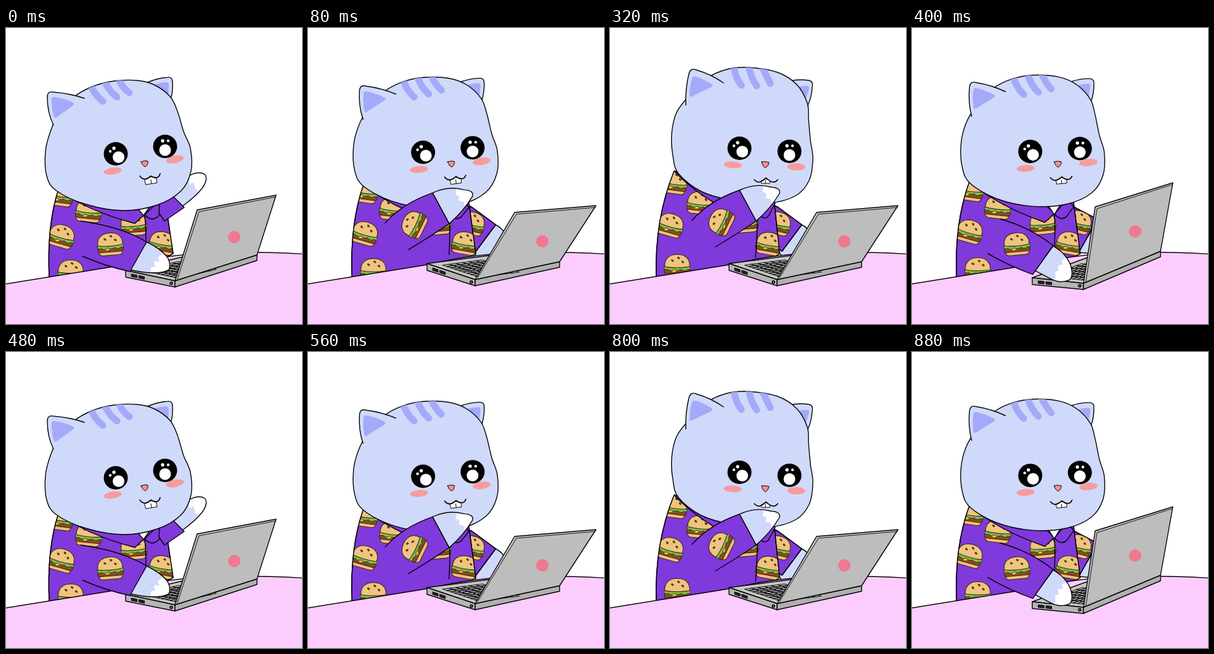
Animation, 480 px wide and 480 px high, one loop 960 ms. Source, as an HTML page with a canvas:

```html
<!DOCTYPE html>
<html lang="en">
<head>
<meta charset="utf-8">
<title>Cat at a laptop</title>
<style>
html, body { margin: 0; height: 100%; overflow: hidden; background: #fff; }
canvas { display: block; }
</style>
</head>
<body>
<canvas id="stage" width="480" height="480"></canvas>
<script>
const g = document.getElementById('stage').getContext('2d');
const STEP = 80;
const FUR = '#cfd9fa', MARK = '#a5a9fa', BLUSH = '#f79c9c', SHIRT = '#8039da', INK = '#000';

// How far the cat leans to the right in each step; arms cycle every three steps.
const LEAN = [0, .27, .78, 1.12, 1, .43];
const ARMS = ['raised', 'chin', 'typing'];

const LAPTOP = {
  raised: { tl: [310, 295], tr: [438, 271], br: [407, 368], front: [274, 410], left: [194, 393], back: [296, 369], logo: [370, 339] },
  chin: { tl: [335, 299], tr: [467, 288], br: [408, 379], front: [271, 408], left: [193, 382], back: [301, 368], logo: [380, 346] },
  typing: { tl: [297, 290], tr: [423, 251], br: [403, 362], front: [278, 414], left: [195, 405], back: [288, 371], logo: [362, 330] }
};

let k = 0; // current lean

const mix = (a, b) => a + (b - a) * k;
const at = (a, b) => [mix(a[0], b[0]), mix(a[1], b[1])];

// Blends two path strings of the same structure by the lean.
function morph(a, b) {
  const ends = b.match(/-?[\d.]+/g);
  let i = 0;
  return a.replace(/-?[\d.]+/g, n => mix(+n, +ends[i++]));
}

function draw(path, fill, stroke = INK, width = 1.4) {
  const p = path instanceof Path2D ? path : new Path2D(path);
  if (fill) { g.fillStyle = fill; g.fill(p); }
  if (stroke) { g.strokeStyle = stroke; g.lineWidth = width; g.stroke(p); }
  return p;
}

function oval([x, y], rx, ry, fill, turn = 0) {
  g.beginPath();
  g.ellipse(x, y, rx, ry, turn, 0, 7);
  g.fillStyle = fill;
  g.fill();
}

function clipped(path, paint) {
  g.save();
  g.clip(path);
  paint();
  g.restore();
}

function shifted(dx, dy, paint) {
  g.save();
  g.translate(dx * k, dy * k);
  paint();
  g.restore();
}

const poly = points => new Path2D('M' + points.map(p => p.join(' ')).join('L') + 'Z');

// Closed smooth curve through all points.
function smooth(pts) {
  const path = new Path2D(), n = pts.length;
  path.moveTo(...pts[0]);
  pts.forEach((p, i) => {
    const before = pts[(i + n - 1) % n], q = pts[(i + 1) % n], after = pts[(i + 2) % n];
    path.bezierCurveTo(p[0] + (q[0] - before[0]) / 6, p[1] + (q[1] - before[1]) / 6,
      q[0] - (after[0] - p[0]) / 6, q[1] - (after[1] - p[1]) / 6, ...q);
  });
  path.closePath();
  return path;
}

function burger(x, y, degrees) {
  const line = '#3a2412';
  g.save();
  g.translate(x, y);
  g.rotate(degrees * Math.PI / 180);
  g.scale(1.12, 1.1);
  draw('M-17 8H17Q18 16 11 16H-11Q-18 16 -17 8Z', '#eebf78', line, 1);
  draw('M-18 4H18Q20 11 15 11H-15Q-20 11 -18 4Z', '#8d4a20', line, 1);
  draw('M-14 4L-5 9L5 4Z', '#f6cf45', null);
  draw('M-19 1Q0 -3 19 1Q21 6 15 5Q11 9 6 5Q1 8 -4 5Q-9 9 -13 5Q-20 7 -19 1Z', '#77c34d', line, .8);
  draw('M-18 1C-19 -12 -10 -17 0 -17S19 -12 18 1Q0 4 -18 1Z', '#efc47e', line, 1);
  for (const [sx, sy] of [[-7, -8], [2, -12], [8, -6]]) oval([sx, sy], 2.2, 1.5, '#5b3515', .6);
  g.restore();
}

function paw(shape, tip) {
  const p = draw(shape, FUR, null);
  clipped(p, () => draw(tip, '#fff', null));
  draw(p, null);
}

function printedSleeve(shape, x, y, turn) {
  const sleeve = draw(shape, SHIRT);
  clipped(sleeve, () => burger(x, y, turn));
  draw(sleeve, null);
}

function rightArm(pose) {
  if (pose === 'raised') shifted(14, 1, () => {
    paw('M268 276L286 289Q308 273 318 260Q328 246 323 238Q314 231 298 239L270 262Z',
      'M294 236L298 254L304 250L307 261L318 270L336 230Z');
    draw('M250 270L270 272L289 291L257 313L248 300Z', SHIRT);
  });
  if (pose === 'chin') shifted(9, 0, () => {
    draw('M300 318Q312 324 318 334L284 382L262 362Z', FUR);
    printedSleeve('M250 284L264 291L302 319L270 362L250 350Z', 263, 317, 14);
  });
  if (pose === 'typing') {
    draw('M292 328L275 344L271 364L292 366Z', FUR);
    printedSleeve('M250 284L264 291L297 308Q293 327 284 340L270 365Z', 270, 315, 14);
  }
}

function leftArm(pose) {
  if (pose === 'chin') shifted(11, -6, () => {
    paw('M199 269Q225 257 250 264Q266 265 264 274Q250 298 226 319Z',
      'M232 258L238 266L236 271L243 275L241 281L250 284L252 300L275 280L266 255Z');
    draw('M122 318Q150 286 199 269L226 319Q195 340 160 361', SHIRT);
    burger(169, 320, -64);
  });
  if (pose === 'typing') shifted(9, -3, () => {
    g.translate(-5, 2);
    paw('M230 353Q250 364 258 383Q264 402 256 408Q240 415 222 404L201 393Z',
      'M254 372L244 376L246 383L238 384L239 393L233 394L234 404L228 412H270V372Z');
    draw('M144 309Q192 322 230 352L197 399Q160 386 124 365', SHIRT);
    burger(171, 350, -5);
  });
  if (pose === 'raised') shifted(8, -2, () => {
    paw('M228 347Q250 357 262 372Q268 384 264 392Q245 402 201 392Z',
      'M256 365L246 372L249 379L240 378L242 387L235 388V402H270V375Z');
    draw('M121 313Q190 323 228 347L201 395Q160 386 124 370', SHIRT);
    burger(169, 351, -5);
  });
}

function body() {
  const torso = new Path2D(morph('M85 262Q66 320 70 405L200 405L271 366L258 278L200 270Z',
    'M104 232Q72 310 75 405L210 405L275 366L266 278L200 260Z'));
  draw(torso, SHIRT);
  clipped(torso, () => {
    const spots = [
      [[88, 271], [104, 251], 8], [[134, 297], [146, 284], 6], [[90, 338], [98, 320], 16],
      [[105, 395], [109, 386], 0], [[207, 319], [219, 314], -5], [[253, 349], [258, 350], 10]
    ];
    for (const [a, b, turn] of spots) burger(...at(a, b), turn);
  });
  draw(torso, null);
  draw(morph('M225 304Q228 330 226 366', 'M239 300Q239 335 236 372'), null);
  draw(morph('M85 262Q130 296 209 317L225 302L200 280Z', 'M104 232Q145 276 224 313L239 299L200 260Z'), SHIRT);
  draw(morph('M225 303Q236 315 246 306L258 294L250 278Z', 'M239 299Q250 313 257 305L268 284L255 276Z'), SHIRT);
  draw(morph('M213 292L223 304L233 290Z', 'M232 283L241 301L250 283Z'), '#fff');
}

function head() {
  const left = [72, 168, 64, 200, 66, 240, 82, 264, 130, 286, 190, 296, 245, 287, 284, 264, 300, 232, 299, 195,
    288, 168, 278, 135, 266, 111, 240, 92, 212, 85, 175, 86, 140, 95, 110, 112, 85, 140];
  const right = [108, 137, 100, 172, 102, 207, 111, 236, 148, 265, 201, 280, 257, 284, 301, 272, 323, 247, 329, 212,
    325, 182, 322, 148, 320, 122, 303, 92, 272, 72, 225, 64, 190, 67, 158, 81, 130, 108];
  const points = [];
  for (let i = 0; i < left.length; i += 2) points.push([mix(left[i], right[i]), mix(left[i + 1], right[i + 1])]);

  draw(morph('M228 89Q245 81 262 80Q270 79 270 88Q271 102 267 116L250 117Z',
    'M296 85Q310 83 323 85Q330 87 328 95Q327 112 321 125L305 117Z'), FUR);
  draw(morph('M240 92Q252 88 260 88Q264 88 264 94L263 112Z', 'M304 96Q314 93 321 94Q324 95 322 101L317 117Z'), MARK, null);

  const skull = draw(smooth(points), FUR);
  clipped(skull, () => {
    draw(morph('M136 90Q143 108 157 119M158 82Q166 102 180 112M181 78Q187 96 200 105',
      'M200 59Q203 81 213 93M224 57Q228 81 238 94M245 59Q253 77 260 90'), null, MARK, 11);
  });

  const ear = new Path2D(morph('M77 157Q67 138 67 112Q67 102 77 104Q103 106 127 114',
    'M123 125Q122 98 128 74Q131 64 140 68Q164 75 184 89'));
  draw(ear, FUR);
  draw(morph('M74 116Q74 111 80 112Q97 115 109 121Q112 123 108 126L82 145Q78 147 77 142Q74 130 74 116Z',
    'M133 82Q134 77 140 79Q156 85 165 91Q168 93 164 96L133 111Q129 113 129 108Q129 96 133 82Z'), MARK, null);

  const tilt = mix(-.15, .07);
  oval(at([173, 232], [199, 222]), 14.5, 5.5, BLUSH, tilt);
  oval(at([274, 213], [302, 225]), 14.5, 6, BLUSH, tilt - .05);
  const leftEye = at([178, 204], [210, 195]), rightEye = at([258, 192], [291, 200]);
  const dot = ([x, y], dx, dy, r) => oval([x + dx, y + dy], r, r, '#fff');
  for (const eye of [leftEye, rightEye]) oval(eye, 19.5, 19, INK);
  dot(leftEye, 4.5, 5.5, 9.5);
  dot(leftEye, -3, -9, 2.7);
  dot(leftEye, -9, -4, 2.2);
  dot(rightEye, 0, 6, 9.5);
  dot(rightEye, -4, -9, 2.7);
  dot(rightEye, 5, -9, 2.2);
  draw(morph('M219 217Q225 214 230 216Q231 222 226 225Q222 224 219 217Z',
    'M246 217Q252 216 258 218Q257 224 252 227Q247 224 246 217Z'), '#f78f8c', INK, 1);
  draw(morph('M225 246L235 241L244 244L245 251L227 254Z', 'M245 248L252 244L260 248L259 252L246 252Z'), '#fff', INK, 1);
  draw(morph('M235 246L236 252', 'M252 247L252 252'), null, INK, 1);
  draw(morph('M217 240Q224 250 235 240Q247 247 250 236', 'M234 246Q242 255 253 243Q265 255 272 246'), null, INK, 1.7);
}

function base({ left, back, front, br }) {
  const far = [front[0] + back[0] - left[0], front[1] + back[1] - left[1]];
  const spot = (u, v) => [0, 1].map(i => left[i] + (front[i] - left[i]) * u + (back[i] - left[i]) * v);
  const down = ([x, y], d) => [x, y + d];
  draw(poly([left, back, far, front]), '#c6c6c6');
  draw(poly([left, front, down(front, 10), down(left, 11)]), '#b5b5b5');
  draw(poly([front, br, down(br, 9), down(front, 10)]), '#b0b0b0');
  draw(poly([spot(.16, .12), spot(.16, .72), spot(.92, .72), spot(.92, .12)]), '#b4b4b4', INK, .9);
  for (let i = 1; i < 6; i++) draw(poly([spot(.16, .12 + i * .1), spot(.92, .12 + i * .1)]), null, INK, .9);
  for (let i = 1; i < 9; i++) draw(poly([spot(.16 + i * .084, .12), spot(.16 + i * .084, .72)]), null, INK, .9);
  for (const u of [.12, .27]) {
    const a = spot(u, 0), b = spot(u + .11, 0);
    draw(poly([down(a, 4), down(b, 4), down(b, 8), down(a, 8)]), '#222', INK, 1);
  }
  oval([front[0] - 6, front[1] + 4], 2.7, 2.7, INK);
  oval([front[0] - 6, front[1] + 4], 1, 1, '#aaa');
}

function lid({ tl, tr, br, front, logo }) {
  draw(poly([tl, tr, br, front]), '#bdbdbd');
  draw(`M${front[0] + 4} ${front[1] - 3}L${tl[0] + 3} ${tl[1] + 3}L${tr[0] - 1} ${tr[1] + 3}`, null, INK, .9);
  oval(logo, 10, 10, '#f0788f');
}

function render(now) {
  const step = Math.floor(now / STEP) % LEAN.length;
  const pose = ARMS[step % 3], laptop = LAPTOP[pose];
  k = LEAN[step];
  g.fillStyle = '#fff';
  g.fillRect(0, 0, 480, 480);
  g.lineJoin = g.lineCap = 'round';

  if (pose !== 'raised') rightArm(pose);
  body();
  if (pose === 'raised') rightArm(pose);
  draw('M-3 415.5L205 382Q300 356 483 366.5V483H-3Z', '#fdccff');
  base(laptop);
  if (pose !== 'chin') leftArm(pose);
  lid(laptop);
  head();
  if (pose === 'chin') leftArm(pose);
}

function loop() {
  render(performance.now());
  requestAnimationFrame(loop);
}
loop();
</script>
</body>
</html>
```
